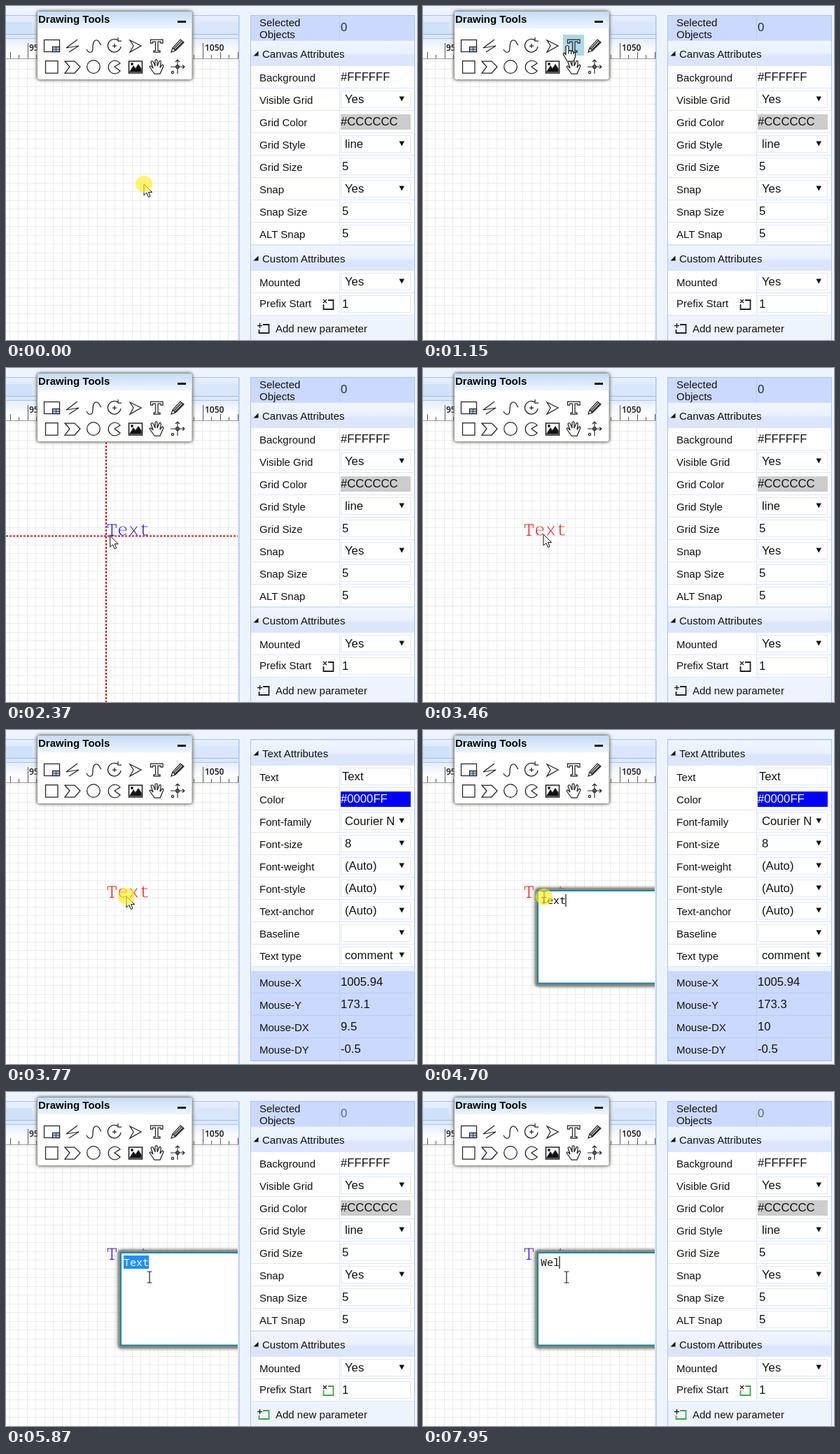
An HTML page that plays this animation: 587 by 478 pixels, repeating every 8 s.

```html
<!DOCTYPE html>
<html lang="en">
<head>
<meta charset="utf-8">
<title>Drawing tools</title>
<style>
  html, body { margin: 0; width: 100%; height: 100%; overflow: hidden; background: #eef4fe; }
  svg { display: block; }
  text { font-family: "Liberation Sans", Arial, sans-serif; font-size: 15px; fill: #111; white-space: pre; }
  .val { font-size: 16.7px; }
  .title { font-weight: bold; fill: #000; }
  .num { font-family: "Open Sans", sans-serif; font-size: 12px; font-weight: 600; }
  .label { font-family: "Liberation Mono", "Courier New", monospace; font-size: 26px; fill: inherit; }
  .edit { font-family: "Noto Sans Mono", monospace; font-size: 15px; }
  .icons { fill: none; stroke: #222; stroke-width: 1.25; }
  .glow { filter: drop-shadow(0 0 2px #77796c) drop-shadow(0 0 2px #77796c); }
</style>
</head>
<body>
<svg id="stage" width="587" height="478" viewBox="0 0 587 478"></svg>
<script>
const LOOP = 8000, STEP = 12.5, GX = 5, GY = 3;
const stage = document.getElementById('stage');

const rect = (x, y, w, h, fill, extra = '') =>
  `<rect x="${x}" y="${y}" width="${w}" height="${h}" fill="${fill}" ${extra}/>`;
const text = (x, y, s, cls = '', extra = '') => `<text x="${x}" y="${y}" class="${cls}" ${extra}>${s}</text>`;
const path = (d, extra = '') => `<path d="${d}" ${extra}/>`;
const group = (id, body, extra = '') => `<g id="${id}" ${extra}>${body}</g>`;

// ---- page and ruler ----
function page() {
  let ticks = '', grid = '';
  for (let x = GX, i = 0; x < 332; x += STEP, i++) {
    const top = (i - 2) % 20 === 0 ? 53 : i % 2 === 0 ? 66 : 70;
    ticks += `M${Math.floor(x) + 1.5} ${top}V75`;
    grid += `M${Math.floor(x) + .5} 76V478`;
  }
  for (let y = GY + 75; y < 478; y += STEP) grid += `M0 ${Math.floor(y) + .5}H332`;
  return rect(0, 0, 587, 478, '#eef4fe') +
    rect(0, 13, 333, 28, 'url(#band)') + rect(0, 13, 333, 1, '#a9c4ec') +
    rect(0, 23, 37, 18, '#cfe0f9') + rect(273, 23, 60, 18, '#d9e6fb') +
    rect(0, 40, 333, 1, '#9dbbe4') + rect(0, 41, 333, 6, '#dce8fb') + rect(0, 46, 333, 1, '#a9c4ec') +
    rect(0, 47, 333, 29, 'url(#ruler)') + rect(0, 76, 333, 402, '#fff') +
    path(grid, 'stroke="#ebebeb" fill="none"') +
    path(ticks, 'stroke="#555" fill="none"') + rect(0, 75, 333, 1, '#999') +
    text(33, 64, '950', 'num') + text(284, 64, '1050', 'num') +
    rect(332, 14, 1.5, 464, '#a9c4ec');
}

// ---- property panel ----
const BLUE = '#ccd9ff';
const drop = y => path(`M561.5 ${y - 3.5}h7.5l-3.75 7z`, 'fill="#111"');
const box = y => rect(478.5, y - 11.5, 99, 24, '#fff', 'stroke="#dfe8f8"');

function row(y, name, value, kind) {
  const mid = y + 15;
  let s = rect(350, y, 233, 32, kind === 'info' ? BLUE : '#fff') +
    rect(350, y + 31, 233, 1, kind === 'info' ? '#b9ccf2' : '#dbe6f8') +
    rect(476, y, 1, 32, kind === 'info' ? '#b9ccf2' : '#dbe6f8') + text(362, y + 22, name);
  if (kind === 'pick') s += box(mid) + drop(mid);
  if (kind === 'input') s += box(mid);
  if (kind === 'fill') s += rect(478, y + 5, 100, 22, value === '#0000FF' ? '#00f' : '#ccc');
  const x = kind === 'pick' ? 484 : kind === 'input' ? 480 : 478;
  const ink = value === '#0000FF' ? 'style="fill:#fff"' : '';
  return s + text(x, y + 21, value, 'val', ink);
}
const rows = (y, list) => list.map((r, i) => row(y + i * 32, ...r)).join('');
const head = (y, name) => rect(350, y, 233, 37, 'url(#head)') + rect(350, y, 233, 1, '#d3e1f7') +
  path(`M360.5 ${y + 15.5}v7h-7z`, 'fill="#111"') + text(366, y + 25, name);
const frame = h => rect(349.5, 13.5, 234, h, 'none', 'stroke="#a9c4ec"');

function canvasPanel() {
  return rect(350, 14, 233, 35, BLUE) + rect(476, 14, 1, 35, '#b9ccf2') +
    text(362, 29, 'Selected') + text(362, 46, 'Objects') + text(478, 36, '0', 'val', 'id="zero"') +
    head(49, 'Canvas Attributes') +
    rows(86, [['Background', '#FFFFFF'], ['Visible Grid', 'Yes', 'pick'], ['Grid Color', '#CCCCCC', 'fill'],
      ['Grid Style', 'line', 'pick'], ['Grid Size', '5', 'input'], ['Snap', 'Yes', 'pick'],
      ['Snap Size', '5', 'input'], ['ALT Snap', '5', 'input']]) +
    head(342, 'Custom Attributes') +
    rows(379, [['Mounted', 'Yes', 'pick'], ['', '1', 'input']]) + text(362, 431, 'Prefix Start') +
    rect(350, 443, 233, 35, '#eef4fe') + text(385, 467, 'Add new parameter') +
    group('marks', path('M460 421H467.5V434H453.5V427M367 456H375.5V468H361.5V463', 'stroke-width="1.8"'), 'fill="none"') +
    path('M453 420l5 5m0-5l-5 5M359 457.5h7m-3.5-3.5v7', 'stroke="#222" stroke-width="1.4"') + frame(480);
}

function textPanel() {
  return head(14, 'Text Attributes') +
    rows(51, [['Text', 'Text', 'input'], ['Color', '#0000FF', 'fill'], ['Font-family', 'Courier N', 'pick'],
      ['Font-size', '8', 'pick'], ['Font-weight', '(Auto)', 'pick'], ['Font-style', '(Auto)', 'pick'],
      ['Text-anchor', '(Auto)', 'pick'], ['Baseline', '', 'pick'], ['Text type', 'comment', 'pick']]) +
    rect(350, 339, 233, 6, '#eef4fe') +
    rows(345, [['Mouse-X', '1005.94', 'info'], ['Mouse-Y', '173.3', 'info'],
      ['Mouse-DX', '10', 'info'], ['Mouse-DY', '-0.5', 'info']]) + frame(460);
}

// ---- tool box ----
function tools() {
  const icons =
    rect(54.5, 48.5, 22, 17, '#fff') + rect(66.5, 58.5, 10, 7, '#a9c8f0') + path('M66 62H77M71.5 58V66', 'stroke-width=".8"') +
    path('M102 48L86 60L104 57L90 66') +
    path('M115 62C118 68 124 68 124 60C124 52 126 48 130 49C134 50 134 55 136 56') +
    path('M160 49A9.3 9.3 0 1 0 164 58M160 45V50H165M152 57h6m-3-3v6') +
    path('M177 49L193 57L177 66L182 57z') +
    path('M206.5 53V48H224V53H221V51H217V64H220V66H211V64H213.5V51H209.5V53z') +
    path('M236 66L238 60L249 48L254 52L242 64zM238 60L242 64M240 61L251 49.500M241 63L253 51') +
    path('M56.5 78.5H74V96H56.5zM84 79H98L106 87L98 96H84L91 87z') +
    '<circle cx="125" cy="87" r="9.3"/>' +
    path('M163 82A9.3 9.3 0 1 0 163 93L155 87z') +
    path('M175.5 79H194.5V96H175.5z', 'stroke-width="1.6"') +
    path('M177 94L182 86L185 90L189 84L193 90V94z', 'fill="#111"') + '<circle cx="180" cy="83" r="1.3" fill="#111"/>' +
    path('M212 97L205 87Q206 84 210 89L207 80Q209 77 211 81L213 86V78Q215 75 216 78V86L219 79Q222 77 221 82L220 88L223 84Q226 84 224 88L220 97z') +
    path('M235 87H255M252 84.5L255 87L252 89.5M245 77V97M242 80L245 77L248 80', 'stroke-width="1.1"') +
    '<circle cx="245" cy="87" r="2.3"/><circle cx="238" cy="95" r="1.6"/>';
  return rect(45, 8, 220.5, 97, '#fff', 'rx="3" class="glow"') + rect(45, 8, 220.5, 24, 'url(#bar)', 'rx="2"') +
    text(46, 24, 'Drawing Tools', 'title') + rect(245, 21, 12, 3, '#111') +
    rect(200, 41, 30, 30, '#add8e6', 'id="hot"') + group('icons', icons, 'class="icons"');
}

// ---- in-place editor ----
function editor() {
  return rect(161, 227, 190, 139, '#8a8a7e', 'rx="3" class="glow"') +
    rect(164, 230, 190, 132.5, '#fff', 'stroke="#1787ac" stroke-width="2"') +
    rect(168, 234, 0, 19, '#1e90ff', 'id="sel"') +
    text(168, 249, '', 'edit', 'id="words"') + rect(0, 235, 1.2, 18, '#111', 'id="caret"');
}

const cursors =
  group('arrow', path('M0 0V16L4 12.5L6.5 18.5L9 17.5L6.5 11.5H11.5z'), 'fill="#fff" stroke="#111"') +
  group('hand', path('M-2 1Q0-2 2 1V7Q5 6 5.5 8Q8 7 9 9Q12 9 11.5 12V16L9 22H0L-4 15Q-7 11-5 10.5Q-3 10-2 13zM2 7v4M5.5 8v4M9 9v3'),
    'fill="#fff" stroke="#111" stroke-width="1.2"') +
  group('beam', path('M-3.5-8H-1Q0-8 0-7Q0-8 1-8H3.5M0-7V7M-3.5 8H-1Q0 8 0 7Q0 8 1 8H3.5'), 'fill="none" stroke="#222" stroke-width="1.2"');

const shade = (id, ...stops) => `<linearGradient id="${id}" x2="0" y2="1">` +
  stops.map(([o, c]) => `<stop offset="${o}" stop-color="${c}"/>`).join('') + '</linearGradient>';

// the mask trims the glyph edges to get a lighter typeface
const thin = '<mask id="thin" maskUnits="userSpaceOnUse" x="-5" y="-30" width="80" height="45">' +
  text(0, 0, 'Text', 'label', 'style="fill:#fff;stroke:#000;stroke-width:.8"') + '</mask>';

stage.innerHTML = '<defs>' + thin + shade('band', [0, '#e6effd'], [1, '#d5e3fa']) +
  shade('ruler', [0, '#e4eefb'], [.65, '#fff'], [1, '#fff']) +
  shade('head', [0, '#f1f6ff'], [.5, '#eaf1fe'], [.6, '#dbe6fc'], [1, '#dbe6fc']) +
  shade('bar', [0, '#c3dcf3'], [.5, '#d9e9f9'], [1, '#edf5fd']) +
  '<clipPath id="view"><path d="M0 76H331V478H0z"/></clipPath></defs>' + page() +
  group('work',
    path('', 'id="cross" stroke="#e01010" stroke-width="2" stroke-dasharray="3 2" fill="none"') +
    group('label', text(0, 0, 'Text', 'label', 'mask="url(#thin)"') +
      path('M1.8-16v5M13.8-16v5M4.5-.6h6.6', 'stroke="currentColor"')) +
    group('editor', editor()), 'clip-path="url(#view)"') +
  tools() + group('canvasPanel', canvasPanel()) + group('textPanel', textPanel()) +
  group('cursor', cursors) + '<circle id="click" r="12" fill="#fdee20" fill-opacity=".65"/>';

const el = {};
stage.querySelectorAll('[id]').forEach(n => el[n.id] = n);
const show = (id, on) => el[id].style.display = on ? '' : 'none';
const put = (id, x, y) => el[id].setAttribute('transform', `translate(${x} ${y})`);
const mouseVal = s => [...el.textPanel.querySelectorAll('.val')].find(n => n.textContent === s);
const mouseY = mouseVal('173.3'), mouseDX = mouseVal('10');

// ---- motion: start, end, steps, from, bend, to ----
const moves = [
  [610, 1150, 8, [197, 255], [146, 165], [206, 57]],
  [1227, 1380, 3, [206, 57], [209, 58], [211, 60]],
  [1530, 2070, 8, [211, 60], [205, 180], [159, 242]],
  [2210, 2520, 5, [159, 242], [147, 240], [147, 240]],
  [3070, 3460, 6, [148, 240], [149, 292], [172, 238]],
  [4700, 4860, 3, [172, 238], [168, 236], [160, 231]],
  [5090, 5870, 11, [160, 231], [178, 252], [205, 265]]
];

function pointer(t) {
  let m = moves[0];
  for (const n of moves) if (t >= n[0]) m = n;
  const [a, b, n, p, q, r] = m;
  const k = t < a ? 0 : Math.min(n, Math.floor((t - a) / ((b - a) / (n - 1)) + 1.01)) / n;
  const u = k * k * (3 - 2 * k) * .5 + k * .5;
  return [0, 1].map(i => (1 - u) ** 2 * p[i] + 2 * u * (1 - u) * q[i] + u * u * r[i]);
}

const snap = (v, o) => Math.round((v - o) / STEP) * STEP + o;
const within = (t, a, b) => t >= a && t < b;

function render(t) {
  let [x, y] = pointer(t);
  if (within(t, 4700, 4780)) [x, y] = [173, 239];
  const editing = t >= 4700, placing = within(t, 1530, 2900) && y > 106;
  const textMode = within(t, 3770, 5090);

  // cursor and click mark
  const kind = editing ? 'beam' : y < 106 && y > 40 ? 'hand' : 'arrow';
  for (const id of ['arrow', 'hand', 'beam']) show(id, id === kind);
  put('cursor', x, y);
  show('click', t < 610 || within(t, 1380, 1530) || within(t, 2520, 3070) || textMode);
  put('click', x, y);
  show('hot', t < 2000 && y > 41 && y < 71 && x > 200 && x < 230);

  // crosshair and label
  const gx = placing ? snap(x, GX) : 142.5, gy = placing ? snap(y, GY) : 240.5;
  show('cross', placing);
  el.cross.setAttribute('d', `M${Math.floor(gx) + 1} 76V478M0 ${Math.floor(gy)}.5H331`);
  show('label', placing || t >= 2670);
  put('label', gx + 1, gy - .5);
  const red = t >= 2670 && t < 5090 && (editing || y < 250);
  el.label.style.fill = el.label.style.color = red ? '#f01818' : t >= 5090 ? '#4a10e0' : '#1a1af0';

  // panels
  show('canvasPanel', !textMode);
  show('textPanel', textMode);
  el.marks.style.stroke = t >= 5090 ? '#3fa845' : '#222';
  el.zero.style.fill = t >= 5090 ? '#56688c' : '#1c2a44';
  mouseY.textContent = editing ? '173.3' : '173.1';
  mouseDX.textContent = editing ? '10' : '9.5';

  // editor
  show('editor', editing);
  const typed = t < 7410 ? 'Text' : 'Wel'.slice(0, t < 7720 ? 1 : t < 7950 ? 2 : 3);
  const picked = within(t, 5090, 7410) ? Math.max(0, Math.min(4, Math.round((x - 168) / 9))) : 0;
  el.words.innerHTML = `<tspan style="fill:#fff">${typed.slice(0, picked)}</tspan>${typed.slice(picked)}`;
  el.sel.setAttribute('width', picked * 9);
  el.caret.setAttribute('x', 167.4 + typed.length * 9);
  show('caret', !picked);
}

function tick(now) {
  render(now % LOOP);
  requestAnimationFrame(tick);
}
render(0);
requestAnimationFrame(tick);
</script>
</body>
</html>
```
